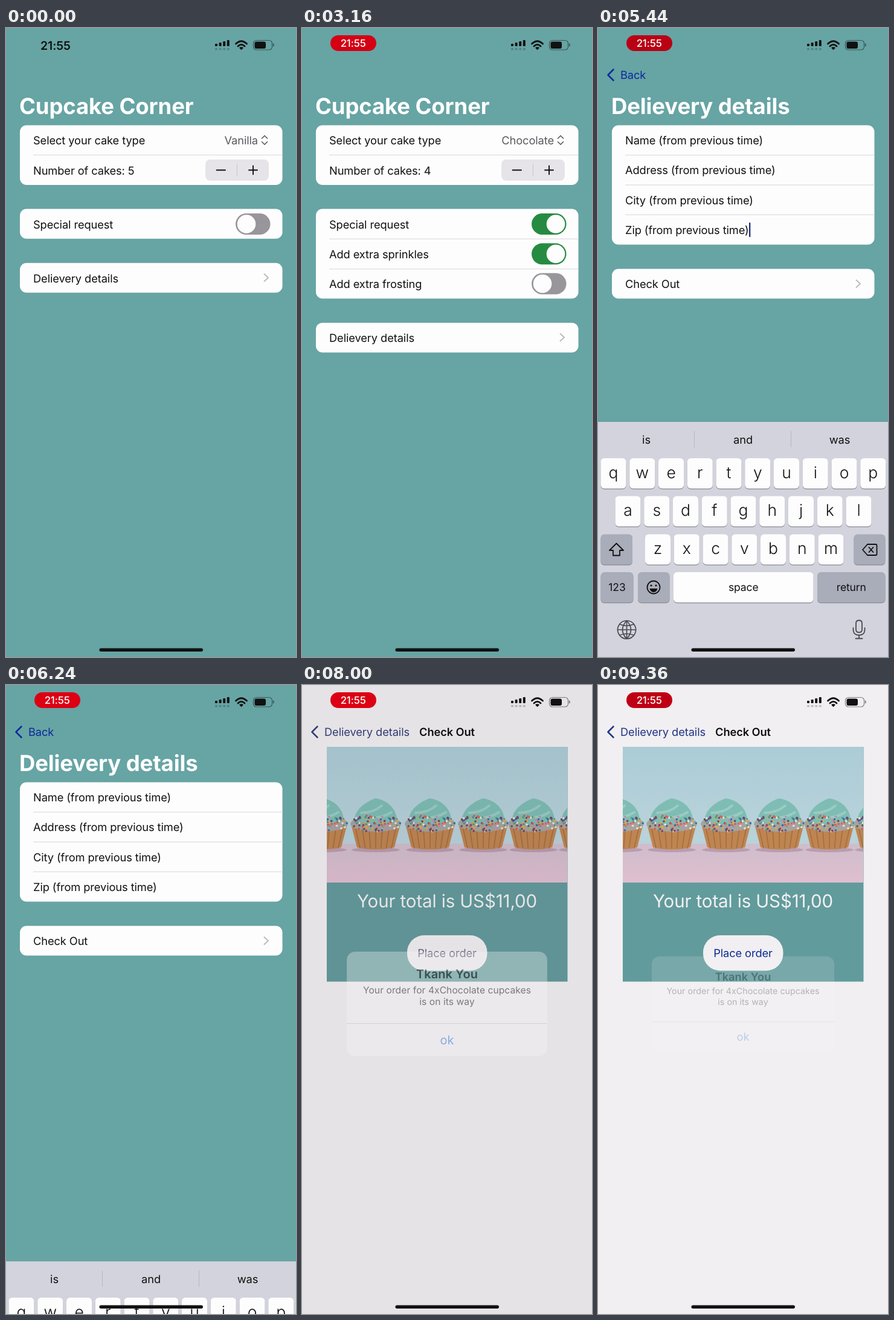
Animation of 480 by 1038 pixels, one loop 9400 ms. Source, as an HTML page:

```html
<!DOCTYPE html>
<html lang="en">
<head>
<meta charset="utf-8">
<title>Cupcake order</title>
<style>
html, body { margin: 0; width: 100%; height: 100%; overflow: hidden; background: #67a4a4; }
svg {
  display: block; width: 100vw; height: 100vh; fill: #111;
  font: 400 18.3px Inter, "Liberation Sans", sans-serif; letter-spacing: -.11px;
  font-optical-sizing: none; text-rendering: geometricPrecision;
}
.large { font-size: 36.5px; font-weight: 700; letter-spacing: -.13px; fill: #fff; }
.mid { text-anchor: middle; }
.end { text-anchor: end; }
.blue { fill: #0b2a9c; }
</style>
</head>
<body>
<svg id="stage" viewBox="0 0 480 1038"></svg>
<script>
const LOOP = 9400, TEAL = '#67a4a4', WHITE = '#fefdfe', BLUE = '#0b2a9c';

// ---- markup helpers
const text = (x, y, s, attrs = '') => `<text x="${x}" y="${y}" ${attrs}>${s}</text>`;
const rect = (x, y, w, h, fill, r = 0, attrs = '') =>
  `<rect x="${x}" y="${y}" width="${w}" height="${h}" rx="${r}" fill="${fill}" ${attrs}/>`;
const path = (d, color, w = 2, attrs = '') =>
  `<path d="${d}" fill="none" stroke="${color}" stroke-width="${w}" stroke-linecap="round" stroke-linejoin="round" ${attrs}/>`;
const circle = (x, y, r, fill, attrs = '') => `<circle cx="${x}" cy="${y}" r="${r}" fill="${fill}" ${attrs}/>`;
const group = (id, body, attrs = '') => `<g id="${id}" ${attrs}>${body}</g>`;
const card = (y, h, attrs = '') => rect(23, y, 434.5, h, WHITE, 11, attrs);
const divider = y => rect(45, y, 412.5, 1.2, '#dcdbde');
const arrow = y => path(`M427.5 ${y - 6}l6.5 6l-6.5 6`, '#bcbac0');
const toggle = (id, y) => group(id, rect(380, y - 17.5, 57.5, 35, '#98959b', 17.5) + circle(398, y, 15.3, WHITE));

let seed = 7;
const random = () => (seed = seed * 16807 % 2147483647) / 2147483647;

// ---- first page
const stepper = rect(330, 217, 105, 35, '#e6e4e8', 8) + rect(382, 224.5, 1, 20, '#c6c4c9') +
  path('M348.5 234.5h14.5M402 234.5h14M409 227.5v14', '#111', 1.9);

const menuItems = ['Vanilla', 'Strawberry', 'Chocolate', 'Rainbow'];
const menu = group('menu',
  group('menuBack',
    `<rect id="menuBox" width="279" height="196" rx="12" fill="#fefdfe" opacity=".85"/>` +
    `<g clip-path="url(#menuClip)">` + rect(0, 98, 279, 50, '#000', 0, 'id="picked" opacity=".3"') +
    [49, 98, 147].map(y => rect(0, y, 279, 1, '#0002')).join('') + `</g>` +
    rect(273.5, 16, 3, 84, '#0004', 1.5), 'style="filter:drop-shadow(0 4px 34px #0003)"') +
  group('menuText', path('M14 26l4.5 5l8-11', '#222') +
    menuItems.map((s, i) => text(35, 31.5 + i * 49, s)).join(''), 'clip-path="url(#menuClip)"'));

const orderPage = group('order',
  rect(0, 0, 480, 1038, TEAL) +
  card(160.5, 98.5) + divider(209) + text(45, 192, 'Select your cake type') +
  text(417, 192, '', 'id="cake" class="end" fill="#5a5a5e"') +
  path('M423.5 182.2l4.5-4.5l4.5 4.5M423.5 187.8l4.5 4.5l4.5-4.5', '#5a5a5e', 1.6) +
  text(45, 241.5, '', 'id="count"') + stepper +
  card(298.5, 49.3, 'id="special"') + text(45, 330.5, 'Special request') + toggle('ask', 323.5) +
  group('extras', divider(347.5) + text(45, 379.5, 'Add extra sprinkles') + toggle('sprinkles', 372.8) +
    divider(397) + text(45, 429, 'Add extra frosting') + toggle('frosting', 422)) +
  group('toDetails', card(387.8, 49, 'id="detailsRow"') + text(45, 419.5, 'Delievery details') + arrow(412)) +
  menu + rect(0, 0, 480, 1038, '#000', 0, 'id="orderDim"'));

// ---- second page
const detailsPage = group('details',
  rect(0, 0, 480, 1038, TEAL) + card(160.5, 197) +
  ['Name', 'Address', 'City', 'Zip'].map((s, i) =>
    (i ? divider(160 + i * 49.2) : '') + text(45, 192 + i * 49.3, s + ' (from previous time)')).join('') +
  rect(250, 321, 2.3, 24, '#1c2c80', 1, 'id="caret"') +
  card(397.5, 49, 'id="checkRow"') + text(45, 429, 'Check Out') + arrow(422) +
  rect(0, 0, 480, 1038, '#000', 0, 'id="detailsDim"'));

const key = (x, y, w, label, dark, size = 26.5) =>
  rect(x, y + 1.3, w, 50, '#898b92', 6) + rect(x, y, w, 50, dark ? '#a9adb9' : WHITE, 6) +
  text(x + w / 2, y + (size > 20 ? 32.5 : 31), label,
    `class="mid" font-size="${size}" font-weight="${size > 20 ? 300 : 400}"`);
const keyRow = (letters, x, y) => [...letters].map((c, i) => key(x + i * 47.75, y, 42, c)).join('');
const keyboard = group('keyboard',
  rect(0, 650, 480, 388, '#d2d3dc') +
  ['is', 'and', 'was'].map((s, i) => text(80 + i * 160, 685.5, s, 'class="mid"')).join('') +
  rect(159, 665, 1, 27, '#b6b7c0') + rect(319, 665, 1, 27, '#b6b7c0') +
  keyRow('qwertyuiop', 4.5, 710) + keyRow('asdfghjkl', 28.5, 772.5) + keyRow('zxcvbnm', 78, 835.5) +
  key(4.5, 835.5, 52.5, '', 1) + path('M30.5 850.5l-11.5 11.5h6v8.5h11v-8.5h6z', '#111', 1.8) +
  key(423.5, 835.5, 52, '', 1) +
  path('M438 861l8-9h13.5q2 0 2 2v14q0 2-2 2h-13.5zM448.5 857l7 8m0-8l-7 8', '#111', 1.8) +
  key(4.5, 898, 54, '123', 1, 17.5) + key(66, 898, 52.5, '', 1) +
  circle(92, 923, 10.5, 'none', 'stroke="#111" stroke-width="1.8"') +
  circle(88, 920, 1.6, '#111') + circle(96, 920, 1.6, '#111') +
  `<path d="M85.5 925h13q-1.5 6-6.5 6t-6.5-6z"/>` +
  key(125, 898, 231.5, 'space', 0, 17.5) + key(363, 898, 112.5, 'return', 1, 17.5) +
  path('M47.5 978a15 15 0 1 0 .1 0zM47.5 978q-14 15 0 30q14-15 0-30v30M32.5 993h30M36 984q11.5 5 23 0M36 1002q11.5-5 23 0', '#4a4b50', 1.7) +
  path('M432 977.5q5 0 5 5v10q0 5-5 5t-5-5v-10q0-5 5-5zM422.5 990v3q0 9 9.5 9t9.5-9v-3M432 1002v5.5M426.5 1007.5h11', '#4a4b50', 1.8));

// ---- third page
const candy = ['#e8604f', '#f4f0ea', '#3f6fb0', '#f0b24a', '#e58aa8', '#4fa58c', '#c9a98f', '#7a4a6a'];
const sprinkles = Array.from({ length: 95 }, () => {
  const a = random() * 6.283, r = Math.sqrt(random());
  return circle((42 * r * Math.cos(a)).toFixed(1), (228 + 14 * r * Math.sin(a)).toFixed(1), 1.8,
    candy[Math.floor(random() * candy.length)]);
}).join('');
const cupcake = `<g id="cupcake"><ellipse cy="272" rx="40" ry="4" fill="#a9869a" opacity=".5"/>` +
  `<path d="M-40 233L-31 268Q0 275 31 268L40 233Z" fill="#c98d55"/>` +
  [-3, -2, -1, 0, 1, 2, 3].map(i => path(`M${i * 11} 238L${i * 8.7} 269`, '#aa7342', 1.5)).join('') +
  `<ellipse cy="229" rx="42" ry="13" fill="#a9b0a6"/>` +
  `<path d="M-35 224C-36 206-16 192 0 187C20 190 35 205 35 224Q0 234-35 224Z" fill="#85c8bd"/>` +
  path('M-24 211Q-4 211 10 199M-6 219Q12 219 26 210', '#a0d8cf', 4) +
  `<g>${sprinkles}</g></g>`;
const photo = group('photo',
  rect(41, 102, 398, 224, 'url(#sky)') + rect(41, 262, 398, 64, 'url(#table)') +
  [34, 122, 212, 300, 383, 465].map(x => `<use href="#cupcake" x="${x}"/>`).join(''), 'clip-path="url(#frame)"');
const spinner = group('spinner', Array.from({ length: 8 }, (_, i) =>
  path('M0-5V-10', '#2d4a4c', 2.6, `opacity="${.15 + i * .1}" transform="rotate(${i * 45})"`)).join(''));

const checkoutPage = group('checkout',
  rect(0, 0, 480, 1038, WHITE) + rect(91, 102, 298, 387.5, TEAL, 0, 'id="panel"') + spinner + photo +
  text(240, 367, 'Your total is US$11,00', 'class="mid" fill="#fff" font-size="29.5" letter-spacing="-.13"') +
  rect(174, 413, 132.5, 58.5, WHITE, 28) + text(240, 449, 'Place order', 'id="place" class="mid blue"'));

const nav =
  group('title1', text(0, 0, 'Cupcake Corner', 'class="large"')) +
  group('title2', text(0, 0, 'Delievery details', 'class="large"')) +
  group('back1', text(0, 0, 'Back', 'class="blue"')) +
  group('back2', text(0, 0, 'Delievery details')) +
  path('M25.5 68.5l-9 9l9 9', BLUE, 2.5, 'id="chevron"') +
  text(240, 84, 'Check Out', 'id="title3" class="mid" font-weight="600"');

const message = (y, s) => text(0, y, s, 'class="mid" font-size="14.2" letter-spacing=".06"');
const alertBox = rect(0, 0, 480, 1038, '#14081c', 0, 'id="dim"') + group('alert',
  rect(-151, -78.5, 302, 157, '#f7f6f8', 13, 'id="alertBack"') +
  text(0, -38.5, 'Tkank You', 'class="mid" font-size="18.2" font-weight="600" letter-spacing=".05"') +
  message(-16, 'Your order for 4xChocolate cupcakes') + message(2, 'is on its way') +
  rect(-151, 29, 302, 1, '#0003') + text(0, 61, 'ok', 'class="mid" fill="#2f78dc"'));

// ---- status bar
const status =
  text(57, 36, '21:55', 'id="clock" font-size="19.5" font-weight="600"') +
  group('pill', rect(47, 12, 76, 26, '#dc0012', 13) +
    group('record', circle(84.5, 25, 7.8, 'none', 'stroke="#fff" stroke-width="2"') + circle(84.5, 25, 4.2, '#fff')) +
    text(84.7, 31.2, '21:55', 'id="pillClock" class="mid" fill="#fff" font-size="16.8" font-weight="500"')) +
  [0, 1, 2, 3].map(i => rect(346 + i * 6.6, 26 - i * 2, 4, 4 + i * 2, '#111', 1) +
    rect(346 + i * 6.6, 33, 4, 3.5, '#0003', 1)).join('') +
  path('M380.5 26Q389.5 17.5 398.5 26M384 30Q389.5 24.8 395 30', '#111', 2.8) +
  `<path d="M386 32.7Q389.5 29.8 393 32.7L389.5 36.2Z"/>` +
  rect(409.5, 20.5, 31, 15.5, 'none', 5, 'stroke="#0007" stroke-width="1.2"') +
  rect(411.5, 22.6, 18.5, 11.3, '#111', 3) + rect(441.8, 25.5, 1.8, 5, '#0007', 1);

const gradient = (id, a, b) => `<linearGradient id="${id}" x2="0" y2="1"><stop stop-color="${a}"/><stop offset="1" stop-color="${b}"/></linearGradient>`;
const $ = id => document.getElementById(id);
$('stage').innerHTML = '<defs>' + gradient('sky', '#b4d8e1', '#c9e2e9') + gradient('table', '#dac8d6', '#ebcadb') +
  `<clipPath id="frame">${rect(41, 102, 398, 224, '#000')}</clipPath>` +
  `<clipPath id="menuClip"><rect id="menuCut" width="279" height="196" rx="12"/></clipPath>` + cupcake + '</defs>' +
  orderPage + detailsPage + keyboard + checkoutPage + nav + alertBox + status +
  rect(154.5, 1023.5, 171.5, 5.5, '#111', 2.7);

// ---- motion helpers
const ramp = (t, start, time) => Math.min(1, Math.max(0, (t - start) / time));
const smooth = (...a) => { const x = ramp(...a); return x * x * (3 - 2 * x); };
const glide = (...a) => 1 - (1 - ramp(...a)) ** 3;
const set = (id, name, value) => $(id).setAttribute(name, value);
const fade = (id, o) => set(id, 'opacity', Math.min(1, Math.max(0, o)));
const move = (id, x, y = 0, s = 1) => set(id, 'transform', `translate(${x} ${y}) scale(${s})`);
const mix = (a, b, p) => `color-mix(in srgb, ${a}, ${b} ${100 * Math.min(1, Math.max(0, p))}%)`;

function flip(id, p) {
  const [track, knob] = $(id).children;
  track.style.fill = mix('#98959b', '#258b41', p);
  knob.setAttribute('cx', 398 + 22 * p);
}

// A large title shrinks into the label of the back button.
function shrink(title, label, p) {
  const x = 22 + 15 * p, y = 142 - 58 * p ** 1.12;
  move(title, x, y, 1 - .48 * p);
  fade(title, 1 - 2 * p);
  move(label, x, y, 1 + 1.15 * (1 - p));
}

function draw(t) {
  const toDetails = glide(t, 3640, 500), toCheckout = glide(t, 6916, 500);

  // status
  const pulse = Math.max(0, Math.cos(2 * Math.PI * (t / 2000 - .76))) ** 2;
  const recording = ramp(t, 240, 160), timeShown = ramp(t, 2000, 200);
  fade('clock', 1 - recording);
  fade('pill', recording);
  fade('record', 1 - timeShown);
  fade('pillClock', timeShown);
  $('pill').firstChild.setAttribute('fill', `rgb(${220 - 37 * pulse},0,20)`);

  // order form
  $('cake').textContent = t < 900 ? 'Vanilla' : 'Chocolate';
  $('count').textContent = 'Number of cakes: ' + (t < 1640 ? 5 : 4);
  const open = smooth(t, 140, 300) * (1 - smooth(t, 900, 300));
  const height = 196 * (.65 + .35 * open);
  move('menu', 168 + 66 * (1 - open), 209, .3 + .7 * open);
  set('menuBox', 'height', height);
  set('menuCut', 'height', height);
  fade('menuBack', open);
  fade('menuText', open * 1.5);
  fade('picked', t > 760 ? .3 : 0);

  const grow = smooth(t, 2040, 350);
  flip('ask', smooth(t, 2000, 250));
  flip('sprinkles', smooth(t, 2700, 250));
  flip('frosting', 0);
  set('special', 'height', 49.3 + 98.7 * grow);
  fade('extras', 2 * grow - 1);
  move('toDetails', 0, 98.6 * grow);
  set('detailsRow', 'fill', t > 3560 ? '#beb9bf' : WHITE);
  move('order', -144 * toDetails);
  fade('orderDim', .09 * toDetails);

  // delivery form
  move('details', 480 * (1 - toDetails) - 144 * toCheckout);
  fade('detailsDim', .09 * toCheckout);
  set('checkRow', 'fill', t > 6840 ? '#beb9bf' : WHITE);
  fade('caret', t > 4740 && t < 6060 && (t - 4740) % 1000 < 800 ? 1 : 0);
  move('keyboard', 0, 390 * (1 - glide(t, 4780, 400) + smooth(t, 6020, 320)));

  // checkout
  const loaded = t > 7440;
  move('checkout', 480 * (1 - toCheckout));
  set('panel', 'x', loaded ? 41 : 91);
  set('panel', 'width', loaded ? 398.5 : 298);
  fade('photo', loaded ? 1 : 0);
  fade('spinner', loaded ? 0 : 1);
  set('spinner', 'transform', `translate(240 214) rotate(${Math.floor(t / 125) * 45})`);

  // navigation bar
  shrink('title1', 'back1', toDetails);
  fade('back1', toCheckout ? 1 - 2 * toCheckout : toDetails);
  shrink('title2', 'back2', toCheckout);
  if (!toCheckout) move('title2', 22 + 480 * (1 - toDetails), 142);
  fade('back2', toCheckout ? .3 + .7 * toCheckout : 0);
  fade('chevron', toDetails);
  set('title3', 'x', 240 + 300 * (1 - toCheckout));
  fade('title3', toCheckout ** 2);

  // alert
  const shown = smooth(t, 7860, 280), alert = shown * (1 - smooth(t, 9190, 260));
  fade('dim', .2 * alert);
  fade('alert', alert);
  fade('alertBack', .4 + .5 * alert);
  move('alert', 240, 526.2, 1.2 - .2 * shown);
  fade('place', t > 7720 && t < 7840 ? .3 : 1);
  $('place').style.fill = mix(BLUE, '#77777b', 4 * alert - 1.2);
  $('back2').style.fill = mix(mix('#2a63d8', BLUE, 2 * toCheckout - 1), '#5c5c60', alert);
  $('chevron').style.stroke = mix(BLUE, '#5c5c60', alert);
}

const begin = performance.now();
function frame() {
  draw((performance.now() - begin) % LOOP);
  requestAnimationFrame(frame);
}
frame();
</script>
</body>
</html>
```
